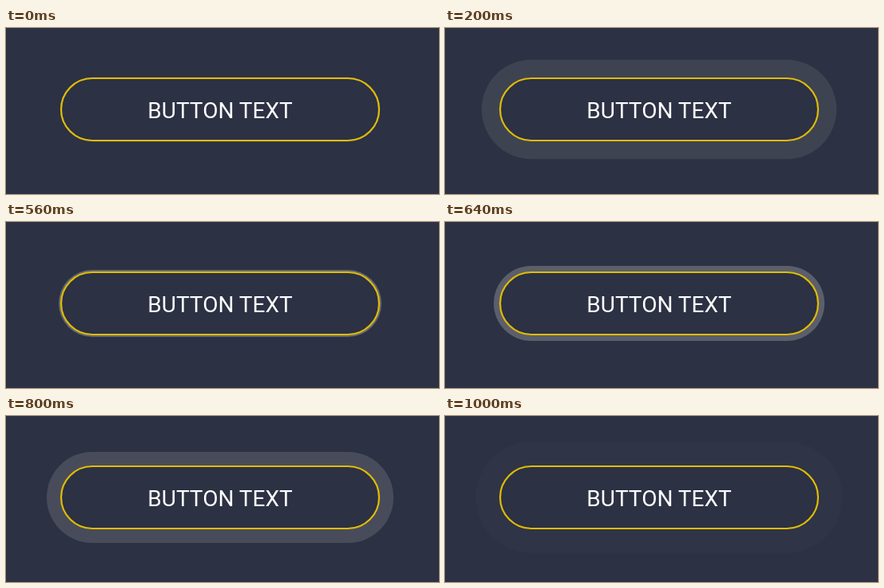
Recreate the animation shown at these times as an HTML page. Size 542 by 208 pixels, loop 1040 ms.

```html
<!DOCTYPE html>
<html lang="en">
<head>
<meta charset="utf-8">
<title>Pulsing button</title>
<style>
  html, body { margin: 0; width: 100%; height: 100%; overflow: hidden; background: #2c3143; }
  svg { display: block; width: 100vw; height: 100vh; }
  text { font: 400 28px Roboto, Arial, sans-serif; fill: #fff; }
</style>
</head>
<body>
<svg viewBox="0 0 542 208">
  <rect width="542" height="208" fill="#2c3143"/>
  <rect id="halo" fill="#ebebe1"/>
  <rect x="69" y="63" width="398" height="78" rx="39" fill="#2c3143" stroke="#e0bc04" stroke-width="2.2"/>
  <text x="268" y="113.4" text-anchor="middle">BUTTON TEXT</text>
</svg>
<script>
  const LOOP = 1040;
  const MAX_SPREAD = 30;
  const PILL = { x: 68, y: 62, width: 400, height: 80 };
  const pulses = [
    { start: 0, duration: 440, ease: p => 1 - Math.pow(1 - p, 2.2) },
    { start: 528, duration: 480, ease: p => p }
  ];
  const halo = document.getElementById('halo');

  function spreadAt(time) {
    for (const { start, duration, ease } of pulses) {
      const progress = (time - start) / duration;
      if (progress > 0 && progress < 1) return MAX_SPREAD * ease(progress);
    }
    return 0;
  }

  function render(time) {
    const spread = spreadAt(time);
    const attributes = {
      x: PILL.x - spread,
      y: PILL.y - spread,
      width: PILL.width + 2 * spread,
      height: PILL.height + 2 * spread,
      rx: PILL.height / 2 + spread,
      opacity: spread > 0 ? 0.32 * (1 - spread / 31) : 0
    };
    for (const [name, value] of Object.entries(attributes)) halo.setAttribute(name, value);
  }

  const origin = performance.now();
  function tick() {
    render((performance.now() - origin) % LOOP);
    requestAnimationFrame(tick);
  }
  render(0);
  requestAnimationFrame(tick);
</script>
</body>
</html>
```
